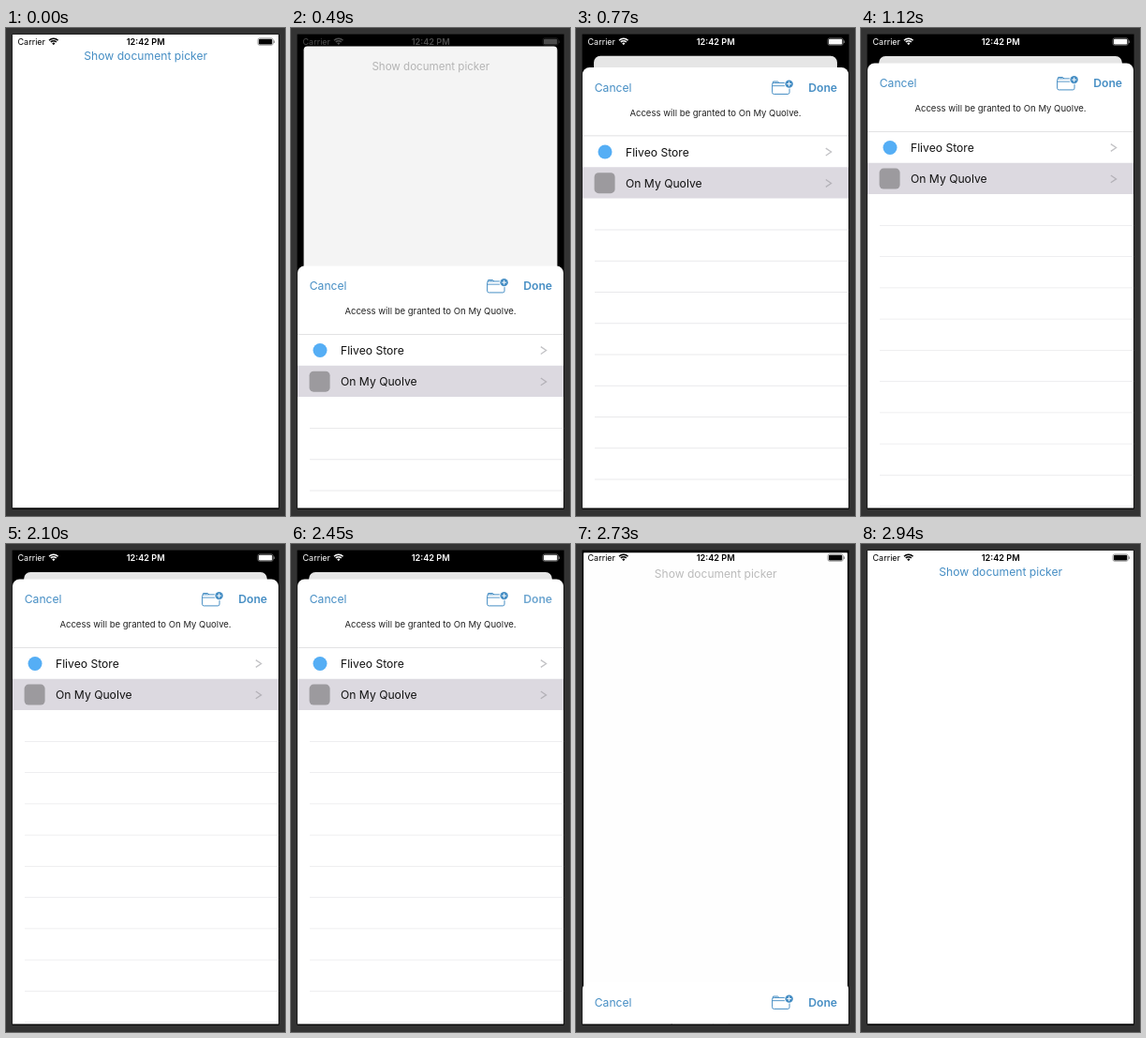
An HTML page with a canvas for the animation above (3.15 s loop, 298 px wide and 520 px high).

```html
<!DOCTYPE html>
<html lang="en">
<head>
<meta charset="utf-8">
<title>Document picker</title>
<style>
  html, body { margin: 0; width: 100%; height: 100%; overflow: hidden; background: #333; }
  canvas { display: block; width: 298px; height: 520px; }
</style>
</head>
<body>
<canvas></canvas>
<script>
const W = 298, H = 520, LOOP = 3150, STEP = 70;
const BLUE = [70, 142, 196], GREY = [188, 188, 188];
const BLUE_CSS = `rgb(${BLUE})`;
const FONT = 'Inter, Roboto, sans-serif';
const SCREEN = { x: 6.9, y: 7, w: 284.2, h: 504.5 };
const ROW = 33.25;

const canvas = document.querySelector('canvas');
const ratio = window.devicePixelRatio || 1;
canvas.width = W * ratio;
canvas.height = H * ratio;
const c = canvas.getContext('2d');

const clamp = v => Math.min(1, Math.max(0, v));
const mix = (a, b, k) => `rgb(${a.map((v, i) => v + (b[i] - v) * k).join(',')})`;

// Spring-like settling from 0 to 1
function settle(ms, rate) {
  const x = Math.max(0, ms) * rate;
  return 1 - (1 + x + x * x / 2) * Math.exp(-x);
}

function sheetProgress(t) {
  if (t >= 2800) return 0;
  return t < 2550 ? settle(t - 347, 0.02) : 1 - settle(t - 2550, 0.03);
}

function text(s, x, y, size, color, { weight = 400, align = 'left' } = {}) {
  c.font = `${weight} ${size}px ${FONT}`;
  c.textAlign = align;
  c.fillStyle = color;
  c.fillText(s, x, y);
}

const body = (s, x, y, color, opts) => text(s, x, y, 12.15, color, opts);

function box(x, y, w, h, r, color) {
  c.fillStyle = color;
  c.beginPath();
  c.roundRect(x, y, w, h, r);
  c.fill();
}

function line(points, color, width) {
  c.strokeStyle = color;
  c.lineWidth = width;
  c.beginPath();
  points.forEach(([x, y]) => c.lineTo(x, y));
  c.stroke();
}

function disc(x, y, r, color) {
  c.fillStyle = color;
  c.beginPath();
  c.arc(x, y, r, 0, 7);
  c.fill();
}

function statusBar(p) {
  const tone = mix([0, 0, 0], [255, 255, 255], p ** 2);
  text('Carrier', 12.5, 18, 9, tone);
  text('12:42 PM', 149.2, 18, 9.2, tone, { weight: 600, align: 'center' });

  c.strokeStyle = tone;
  c.lineWidth = 1.6;
  for (const r of [6.7, 4.2]) {
    c.beginPath();
    c.arc(50.8, 18, r, -Math.PI * 0.75, -Math.PI * 0.25);
    c.stroke();
  }
  c.fillStyle = tone;
  c.beginPath();
  c.moveTo(50.8, 18.3);
  c.arc(50.8, 18, 2.3, -Math.PI * 0.75, -Math.PI * 0.25);
  c.fill();

  c.globalAlpha = 0.45;
  c.lineWidth = 0.8;
  c.beginPath();
  c.roundRect(268.9, 10.9, 16.4, 7.4, 2);
  c.stroke();
  box(286, 13.2, 1, 2.8, 0.5, tone);
  c.globalAlpha = 1;
  box(269.9, 11.8, 14.4, 5.6, 1.2, tone);
}

function card(p, grey) {
  const { x, y, w, h } = SCREEN;
  const scale = 1 - 0.0864 * p;
  c.save();
  c.translate(x + w / 2, y + 23 * p);
  c.scale(scale, scale);
  box(-w / 2, 0, w, h, 7.6 * p, '#fff');
  body('Show document picker', 0.2, 27.2, mix(BLUE, GREY, grey), { align: 'center' });
  box(-w / 2, 0, w, h, 7.6 * p, `rgba(0,0,0,${0.1 * p ** 1.4})`);
  c.restore();
}

function folder(color) {
  c.strokeStyle = color;
  c.lineWidth = 1;
  c.beginPath();
  c.roundRect(209.6, 16.4, 18.4, 12, 1.8);
  c.stroke();
  line([[210, 17.2], [210.6, 15], [215.4, 15], [217, 16.4]], color, 1);
  line([[209.6, 19.6], [228, 19.6]], color, 0.9);
  disc(227.6, 17.6, 5.1, '#fff');
  disc(227.6, 17.6, 4.2, color);
  line([[225.2, 17.6], [230, 17.6]], '#fff', 1);
  line([[227.6, 15.2], [227.6, 20]], '#fff', 1);
}

function chevron(y, color) {
  line([[266.8, y - 3.9], [272.6, y], [266.8, y + 3.9]], color, 1.3);
}

function sheet(p, doneAlpha) {
  const { x, w } = SCREEN;
  c.save();
  c.translate(0, 512 - 474.5 * p);
  box(x, 0, w, 520, [7.6, 7.6, 0, 0], '#fff');

  body('Cancel', 19.7, 25.6, BLUE_CSS);
  folder(BLUE_CSS);
  c.globalAlpha = doneAlpha;
  body('Done', 279, 25.6, BLUE_CSS, { weight: 600, align: 'right' });
  c.globalAlpha = 1;
  text('Access will be granted to On My Quolve.', 149, 51.8, 9.55, '#222', { align: 'center' });
  box(x, 72.4, w, 0.8, 0, '#d8d8da');

  disc(31, 90, 7.5, '#55aef5');
  body('Fliveo Store', 53, 94.5, '#111');
  chevron(90, '#c2c2c5');

  box(x, 106.2, w, ROW, 0, '#dcd9e0');
  box(19.6, 112.1, 22, 22, 4.5, '#9c9a9e');
  body('On My Quolve', 53, 127.8, '#111');
  chevron(123.4, '#b4b2b8');

  for (let i = 1; i < 14; i++) box(20, 139.3 + i * ROW, 272, 0.8, 0, '#e9e9eb');
  c.restore();
}

function draw(t) {
  const p = sheetProgress(t);
  const grey = t < 2000 ? clamp((t - 300) / 150) : clamp((2940 - t) / 210);
  const doneAlpha = t < 2310 ? 1 : 0.5 + 0.5 * clamp((t - 2310) / 240);
  const { x, y, w, h } = SCREEN;

  c.setTransform(ratio, 0, 0, ratio, 0, 0);
  c.fillStyle = '#333';
  c.fillRect(0, 0, W, H);
  c.fillStyle = '#000';
  c.fillRect(6.6, 6.6, 285, 506.2);

  c.save();
  c.beginPath();
  c.rect(x, y, w, h);
  c.clip();
  card(p, grey);
  if (p > 0) sheet(p, doneAlpha);
  statusBar(p);
  c.restore();
}

const start = performance.now();
function tick() {
  const t = (performance.now() - start) % LOOP;
  draw(Math.floor(t / STEP) * STEP);
  requestAnimationFrame(tick);
}
tick();
</script>
</body>
</html>
```
